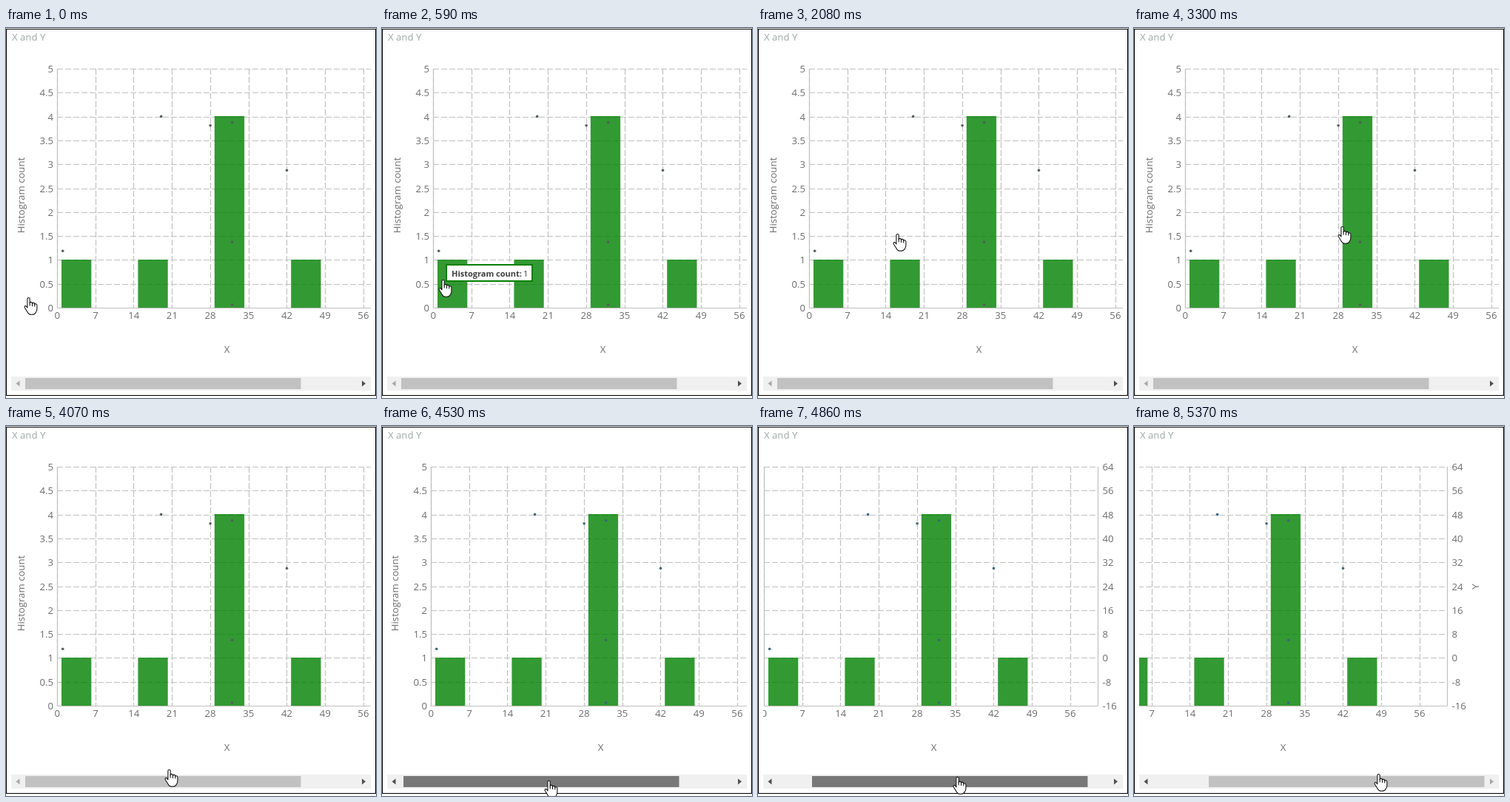
An HTML page with a canvas for the animation above (5830 ms loop, 500 by 500 pixels).

```html
<!DOCTYPE html>
<html lang="en">
<head>
<meta charset="utf-8">
<title>X and Y</title>
<style>
html, body { margin: 0; width: 100%; height: 100%; overflow: hidden; background: #fff; }
canvas { display: block; }
</style>
</head>
<body>
<canvas id="stage" width="500" height="500"></canvas>
<script>
const ctx = document.getElementById('stage').getContext('2d');
const LOOP = 5830;
const FONT = '"Open Sans", "Noto Sans", sans-serif';
const GRID = '#c0c0c0', LABEL = '#6c6c6c', GREEN = '#008000';

// Plot area in scrollable coordinates
const LEFT = 69, RIGHT = 520.5, TOP = 55, BOTTOM = 378;
const xAt = v => LEFT + v * 51.7 / 7;
const yAt = v => BOTTOM - v * (BOTTOM - TOP) / 5;
const crisp = v => Math.round(v) + 0.5;

const bars = [1, 1, 4, 1].map((count, i) => ({ x: 75 + i * 103.4, w: 40.3, count }));
const points = [[1, 3], [19, 48], [28, 45], [32, 46], [32, 6], [32, -15], [42, 30]];

// Pointer travel; each move advances in a number of equal time steps
const smooth = p => p * p * (3 - 2 * p);
const linear = p => p;
const moves = [
  { start: 170, end: 590, steps: 10, to: [82, 340], ease: smooth },
  { start: 1520, end: 2080, steps: 13, to: [188, 278], ease: smooth },
  { start: 2130, end: 2540, steps: 10, to: [285, 254], ease: smooth },
  { start: 3300, end: 3840, steps: 13, to: [232, 432], ease: linear },
  { start: 3890, end: 4070, steps: 4, to: [220, 464], ease: linear },
  { start: 4120, end: 4220, steps: 3, to: [222, 479], ease: linear },
  { start: 4450, end: 4990, steps: 12, to: [304, 470], ease: p => p ** 1.93 },
  { start: 5040, end: 5190, steps: 4, to: [330, 470], ease: linear }
];
const DRAG_START = 4450, DRAG_END = 5370, GRAB_X = 222;
const THUMB_X = 26, THUMB_W = 372.5, THUMB_TRAVEL = 75, SCROLL_RATIO = 1.295;

function pointerAt(t) {
  let pos = [30, 364];
  for (const { start, end, steps, to, ease } of moves) {
    if (t < start) break;
    const done = Math.min(1, (t - start) / (end - start));
    const p = ease((1 + Math.floor(done * (steps - 1) + 1e-6)) / steps);
    pos = pos.map((v, i) => v + (to[i] - v) * p);
  }
  return pos;
}

function text(str, x, y, { size = 13.2, color = LABEL, align = 'center', weight = 400 } = {}) {
  ctx.font = `${weight} ${size}px ${FONT}`;
  ctx.fillStyle = color;
  ctx.textAlign = align;
  ctx.fillText(str, x, y);
}

function sideText(str, x, y) {
  ctx.save();
  ctx.translate(x, y);
  ctx.rotate(-Math.PI / 2);
  text(str, 0, 0);
  ctx.restore();
}

function line(x1, y1, x2, y2) {
  ctx.beginPath();
  ctx.moveTo(x1, y1);
  ctx.lineTo(x2, y2);
  ctx.stroke();
}

function drawChart(scroll) {
  ctx.save();
  ctx.beginPath();
  ctx.rect(7, 25, 486, 440);
  ctx.clip();
  ctx.translate(-Math.round(scroll), 0);

  ctx.strokeStyle = GRID;
  ctx.lineWidth = 1.2;
  ctx.setLineDash([8, 3]);
  for (let v = 0; v <= 56; v += 7) line(crisp(xAt(v)), TOP, crisp(xAt(v)), BOTTOM);
  for (let v = 0.5; v <= 5; v += 0.5) line(LEFT, crisp(yAt(v)), RIGHT, crisp(yAt(v)));
  ctx.setLineDash([]);
  line(LEFT + 0.5, TOP, LEFT + 0.5, BOTTOM);
  line(RIGHT, TOP, RIGHT, BOTTOM);
  line(LEFT, BOTTOM + 0.5, RIGHT, BOTTOM + 0.5);

  ctx.fillStyle = 'rgba(0, 128, 0, 0.8)';
  for (const { x, w, count } of bars) {
    const top = Math.floor(yAt(count));
    ctx.fillRect(x, top, w, BOTTOM - top);
  }

  ctx.fillStyle = scroll ? '#3b6478' : '#525c5c';
  for (const [x, y] of points) {
    ctx.beginPath();
    ctx.arc(xAt(x) + 0.3, yAt((y + 16) / 16), 1.8, 0, Math.PI * 2);
    ctx.fill();
  }

  for (let v = 0; v <= 56; v += 7) text(v, xAt(v) + 0.3, 393);
  for (let v = 0; v <= 5; v += 0.5) {
    const y = yAt(v) + 5;
    text(v, 64, y, { align: 'right' });
    text(v * 16 - 16, RIGHT + 6, y, { align: 'left' });
  }
  text('X', 298.5, 439);
  sideText('Histogram count', 25, 226);
  sideText('Y', 563, 217);
  ctx.restore();
}

function drawArrow(x, dir, enabled) {
  ctx.fillStyle = enabled ? '#505050' : '#a8a8a8';
  ctx.beginPath();
  ctx.moveTo(x + dir * 2.5, 480.5);
  ctx.lineTo(x - dir * 2.5, 476.5);
  ctx.lineTo(x - dir * 2.5, 484.5);
  ctx.fill();
}

function drawScrollbar(offset, color) {
  ctx.fillStyle = '#f0f0f0';
  ctx.fillRect(7, 471, 486, 19);
  ctx.fillStyle = color;
  ctx.fillRect(THUMB_X + Math.round(offset), 473, THUMB_W, 15);
  drawArrow(16, -1, offset > 0);
  drawArrow(483.5, 1, offset < THUMB_TRAVEL);
}

function drawTooltip(x, y, count) {
  const flip = x > 250;
  const left = Math.round(flip ? x - 128 : x + 5);
  const top = Math.round(flip ? y - 30 : y - 20);
  ctx.fillStyle = '#fff';
  ctx.fillRect(left, top, 116, 22);
  ctx.strokeStyle = GREEN;
  ctx.lineWidth = 2;
  ctx.strokeRect(left, top, 116, 22);
  const style = { size: 11, color: '#3c3c3c', align: 'left' };
  text('Histogram count:', left + 7, top + 16, { ...style, weight: 700 });
  text(count, left + 104, top + 16, style);
}

const hand = new Path2D(`M-1.6 14 V2 Q-1.6 .5 0 .5 T1.7 2 V7.6
  Q2 6.2 3.4 6.4 Q5 6.6 5 8.2 Q5.4 7.2 6.7 7.4 Q8.3 7.7 8.3 9.3
  Q8.7 8.5 9.9 8.8 Q11.4 9.2 11.4 11 V15.5 Q11.4 18 10 20
  Q8.8 23.3 4 23.3 Q.2 23.3 -1.4 20 L-5 14.2 Q-6 12.5 -4.9 11.6 Q-3.7 10.8 -1.6 14 Z`);
const knuckles = new Path2D('M1.7 7 V11.5 M5 8 V12 M8.3 9 V12.5');

function drawHand(x, y) {
  ctx.save();
  ctx.translate(Math.round(x) + 0.5, Math.round(y));
  ctx.fillStyle = '#fff';
  ctx.strokeStyle = '#111';
  ctx.lineWidth = 1.1;
  ctx.lineJoin = 'round';
  ctx.fill(hand);
  ctx.stroke(hand);
  ctx.stroke(knuckles);
  ctx.restore();
}

function thumbColor(t, y) {
  if (t >= DRAG_END) return '#c1c1c1';
  if (t >= DRAG_START) return '#787878';
  return y >= 473 ? '#a8a8a8' : '#c1c1c1';
}

function draw(t) {
  const [x, y] = pointerAt(t);
  const offset = t < DRAG_START ? 0 : Math.max(0, Math.min(THUMB_TRAVEL, x - GRAB_X));

  ctx.fillStyle = '#fff';
  ctx.fillRect(0, 0, 500, 500);
  drawChart(offset * SCROLL_RATIO);
  text('X and Y', 8, 17, { color: '#9aa8a2', align: 'left' });
  drawScrollbar(offset, thumbColor(t, y));
  ctx.strokeStyle = '#000';
  ctx.lineWidth = 1;
  ctx.strokeRect(0.5, 1.5, 499, 495);

  const hit = bars.find(b => x >= b.x && x <= b.x + b.w && y >= yAt(b.count) && y <= BOTTOM);
  if (hit) drawTooltip(x, y, hit.count);
  drawHand(x, y);
}

const origin = performance.now();
function frame() {
  draw((performance.now() - origin) % LOOP);
  requestAnimationFrame(frame);
}
frame();
</script>
</body>
</html>
```
